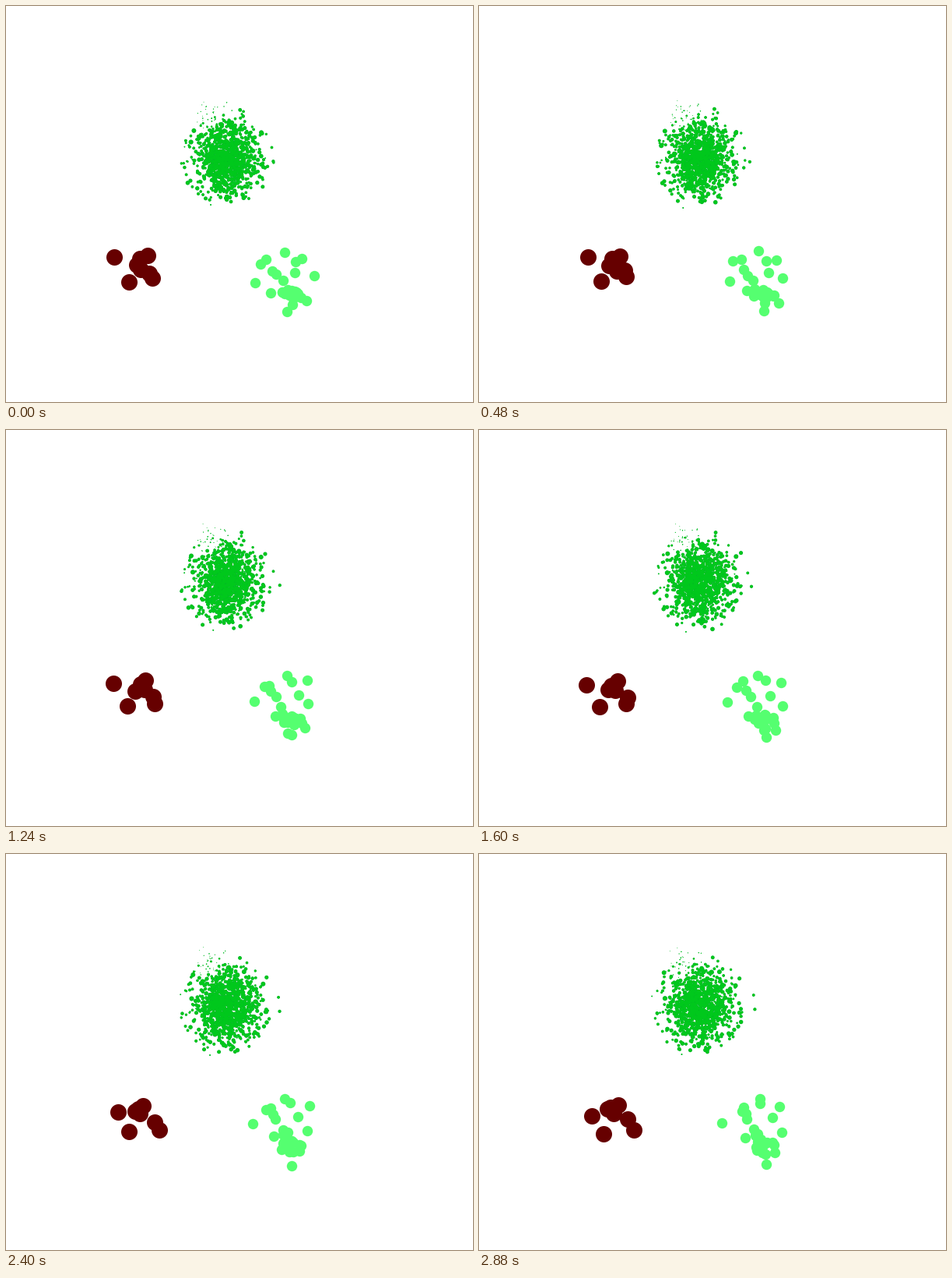
A matplotlib script that plays this animation: 600x508 px, repeating every 2920 ms.

```python
import numpy as np
import matplotlib.pyplot as plt
from matplotlib.animation import FuncAnimation

W, H, DPI = 600, 508, 100
FRAMES, STEP_MS = 73, 40
STEP = 0.65  # spread of one random step, in px
rng = np.random.default_rng(12)

# First position and total drift (x, y, dx, dy) of the discs that stand out.
DARK = [
    (139, 322, 6, 14), (158, 354, 2, 5), (182, 320, -3, 2), (188, 349, 11, 5),
    (172, 324, -3, 1), (168, 332, -3, -5), (173, 338, 0, -5), (184, 343, 7, -3),
]
LIGHT = [
    (358, 316, 3, -2), (380, 324, 6, 0), (334, 325, 6, 0), (327, 331, 11, -1),
    (320, 355, -8, -10), (396, 346, -7, 11), (361, 392, 8, 6), (340, 368, 2, -4),
    (372, 328, -11, -8), (386, 378, -6, 5), (342, 340, 1, -7), (371, 342, 6, -4),
    (347, 344, -3, -4), (356, 352, -3, 1),
]


def walk(n):
    steps = rng.normal(0, STEP, (FRAMES, n, 2))
    steps[0] = 0
    return steps.cumsum(axis=0)


def drift(rows):
    """Random walks bent to end at the given drift."""
    rows = np.array(rows, float)
    path = walk(len(rows))
    t = np.linspace(0, 1, FRAMES)[:, None, None]
    return rows[:, :2] + path + t * (rows[:, 2:] - path[-1])


def cloud(n, center, spread, reach):
    """Gaussian cloud of free walkers, cut off at a radius."""
    pts = rng.normal(0, 1, (4 * n, 2)) * spread
    pts = pts[np.hypot(*pts.T) < reach][:n]
    return pts + center + walk(n)


core = cloud(1000, (284, 195), 22, 64)
core_r = np.clip(rng.normal(1.9, 0.4, 1000), 0.8, 3)
# Dots shrink towards the upper left, where the dust lies.
core_r *= np.clip(np.hypot(*(core[0] - (256, 137)).T) / 28, 0.2, 1)
dust = cloud(32, (263, 138), (12, 8), 28)
dust_r = rng.uniform(0.3, 0.7, 32)

green = np.hstack([core, dust])
green_r = np.concatenate([core_r, dust_r])
light = np.hstack([drift(LIGHT), cloud(16, (367, 369), (8, 7), 15)])

# The darker green below shows only as a rim around loose dots.
layers = [
    (drift(DARK), 10.5, "#660000"),
    (light, 6.7, "#55ff70"),
    (green, green_r * 1.1, "#00b02a"),
    (green, green_r * 0.9, "#00c81c"),
]

fig = plt.figure(figsize=(W / DPI, H / DPI), dpi=DPI, facecolor="white")
ax = fig.add_axes([0, 0, 1, 1])
ax.set(xlim=(0, W), ylim=(H, 0))
ax.axis("off")

dots = []
for path, radius, color in layers:
    size = (2 * radius * 72 / DPI) ** 2
    dots.append(ax.scatter(*path[0].T, s=size, c=color, linewidths=0))


def draw(frame):
    for dot, (path, _, _) in zip(dots, layers):
        dot.set_offsets(path[frame])
    return dots


anim = FuncAnimation(fig, draw, frames=FRAMES, interval=STEP_MS,
                     repeat=True, repeat_delay=0, blit=False)
plt.show()
```
